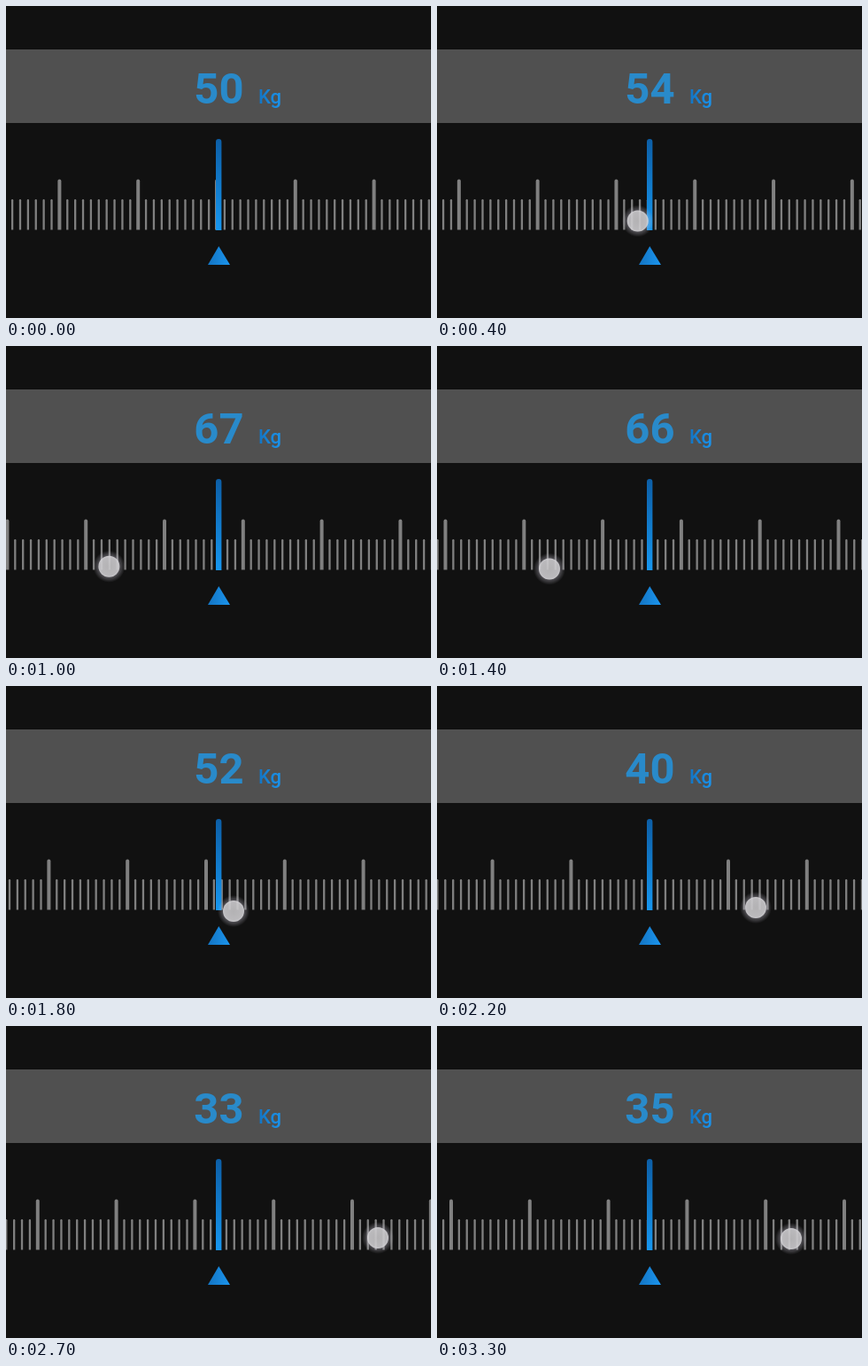
Animation, 480 px wide and 352 px high, one loop 3.4 s. Source, as an HTML page:

```html
<!DOCTYPE html>
<html lang="en">
<head>
<meta charset="utf-8">
<title>Weight picker</title>
<style>
  html, body { margin: 0; width: 100%; height: 100%; overflow: hidden; background: #111; }
  svg { display: block; width: 480px; height: 352px; }
  text { font-family: Roboto, Arial, sans-serif; }
</style>
</head>
<body>
<svg viewBox="0 0 480 352">
  <defs>
    <linearGradient id="needle" x1="0" y1="0" x2="0" y2="1">
      <stop offset="0" stop-color="#0c5ea6"/>
      <stop offset="1" stop-color="#1797f0"/>
    </linearGradient>
    <linearGradient id="accent" x1="0" y1="0" x2="1" y2="0">
      <stop offset="0" stop-color="#1374c2"/>
      <stop offset="1" stop-color="#1b95ee"/>
    </linearGradient>
    <radialGradient id="glow">
      <stop offset=".6" stop-color="#c8c4d2" stop-opacity=".42"/>
      <stop offset="1" stop-color="#c8c4d2" stop-opacity="0"/>
    </radialGradient>
    <radialGradient id="knob">
      <stop offset="0" stop-color="#c6c5c6" stop-opacity=".82"/>
      <stop offset=".8" stop-color="#cecdcf" stop-opacity=".82"/>
      <stop offset="1" stop-color="#dcdbde" stop-opacity=".84"/>
    </radialGradient>
  </defs>
  <rect width="480" height="352" fill="#111"/>
  <rect y="49" width="480" height="83" fill="#505050"/>
  <text id="value" x="240.4" y="110" font-size="49" font-weight="700" text-anchor="middle" fill="#298aca">50</text>
  <text x="285" y="110" font-size="22" font-weight="500" fill="url(#accent)">Kg</text>
  <g id="ruler" fill="#808080"></g>
  <path d="M237 253V153.2a3.2 3.2 0 0 1 6.4 0V253Z" fill="url(#needle)"/>
  <path d="M240.3 271 253 292H228Z" fill="url(#accent)"/>
  <g id="touch">
    <circle r="18" fill="url(#glow)"/>
    <circle r="12" fill="url(#knob)"/>
  </g>
</svg>
<script>
const LOOP = 3400, STEP = 100, GAP = 8.88, CENTER = 240;

// time, x of the 50 mark, touch x, touch y
const keys = [
  [0, 238, 268, 240],
  [100, 237.5, 266, 240],
  [600, 174.3, 197, 245],
  [1150, 77, 104, 250],
  [1400, 98.3, 127, 251.5],
  [1800, 226, 257, 254],
  [2200, 329, 360, 250],
  [2700, 391, 420, 239],
  [2850, 396, 425, 238],
  [3300, 371.2, 400, 240]
];

const $ = id => document.getElementById(id);
const value = $('value'), ruler = $('ruler'), touch = $('touch');

for (let n = -10; n <= 110; n++) {
  const major = n % 10 === 0;
  const w = major ? 4 : 2.3, top = major ? 195.5 : 218;
  const tick = document.createElementNS('http://www.w3.org/2000/svg', 'path');
  const x = (n - 50) * GAP - w / 2, r = w / 2;
  tick.setAttribute('d', `M${x} 252.5V${top + r}a${r} ${r} 0 0 1 ${w} 0V252.5Z`);
  ruler.append(tick);
}

// Slope at a key; flat where the motion turns round
function slope(i, col) {
  const a = keys[i - 1], b = keys[i], c = keys[i + 1];
  if (!a || !c || (b[col] - a[col]) * (c[col] - b[col]) <= 0) return 0;
  return (c[col] - a[col]) / (c[0] - a[0]);
}

function at(t, col) {
  let i = 0;
  while (i < keys.length - 2 && t > keys[i + 1][0]) i++;
  const a = keys[i], b = keys[i + 1], d = b[0] - a[0];
  const u = (t - a[0]) / d, v = 1 - u;
  return a[col] * v * v * (1 + 2 * u) + b[col] * u * u * (3 - 2 * u)
    + d * u * v * (slope(i, col) * v - slope(i + 1, col) * u);
}

function draw() {
  const t = Math.floor(performance.now() % LOOP / STEP) * STEP;
  const mark = at(t, 1);
  ruler.setAttribute('transform', `translate(${mark})`);
  value.textContent = Math.round(50 + (CENTER - mark) / GAP);
  touch.setAttribute('transform', `translate(${at(t, 2)} ${at(t, 3)})`);
  touch.setAttribute('visibility', t ? 'visible' : 'hidden');
  requestAnimationFrame(draw);
}
draw();
</script>
</body>
</html>
```
